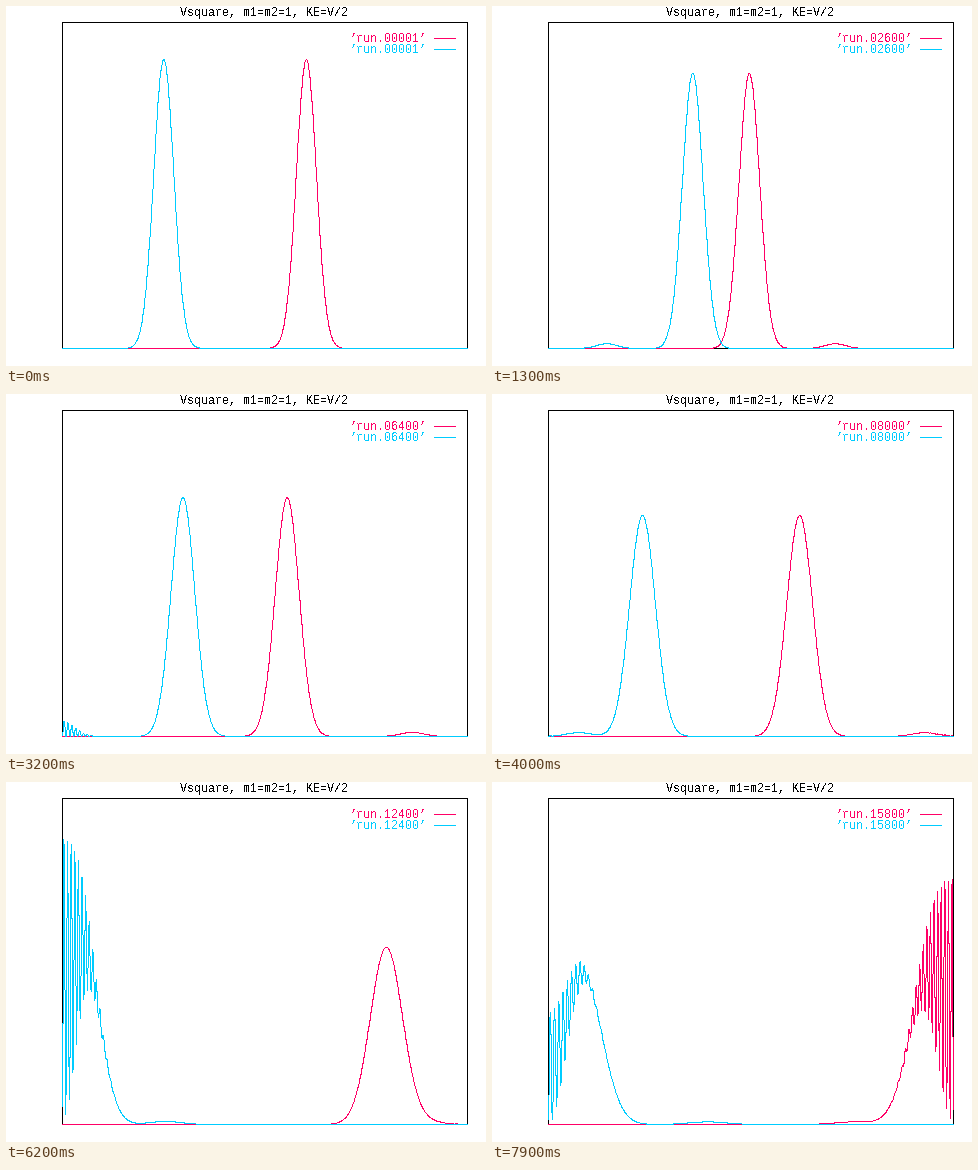
Write a matplotlib script that moves like this. It is 480 px wide and 360 px high and loops after 8 s.

```python
import math

import numpy as np
import matplotlib.pyplot as plt
from matplotlib.animation import FuncAnimation
from matplotlib.collections import LineCollection
from matplotlib.patches import Rectangle

W, H, DPI = 480, 360, 100
FRAMES, INTERVAL = 80, 100
LEFT, RIGHT, TOP, BASE = 56, 461, 16, 342
PINK, CYAN = "#ff0066", "#00ccff"
PX = 72 / DPI

# Packet physics, in pixels and frames
PEAK = 289.0            # height of the marginal density at the start
STRAY = 0.017           # share of probability sent off the wrong way
SIGMA, TAU = 10.0, 49.5  # starting width and spreading time
SPEED = 3.305
K = SPEED * TAU / (2 * SIGMA**2)
START, T_HIT = 157.3, 18.9
TURN = START + SPEED * T_HIT
MIRROR = 457.2          # sum of the two particles' positions

# Simulation grid; the hard walls sit one step outside it
x, STEP = np.linspace(LEFT, RIGHT, 1401, retstep=True)
WALL_L, WALL_R = LEFT - STEP, RIGHT + STEP
erf = np.vectorize(math.erf)


def packet(x, center, t):
    """Spreading Gaussian wave packet moving left."""
    z = 1 + 1j * t / TAU
    d = x - center
    return np.exp(-d**2 / (4 * SIGMA**2 * z) - 1j * K * d) / np.sqrt(z)


def against_wall(x, center, wall, t):
    """Density of a packet and its image behind a hard wall."""
    return np.abs(packet(x, center, t) - packet(2 * wall - x, center, t))**2


def collision(u, t):
    """Marginal density while the pair bounces off its barrier."""
    s = SIGMA * math.hypot(1, t / TAU)
    c = SPEED * (t - T_HIT)

    def half(c):
        cdf = 0.5 * (1 + erf((u + c) / (s * math.sqrt(2))))
        return np.exp(-(u - c)**2 / (2 * s * s)) * cdf

    return SIGMA / s * (half(c) + half(-c))


def density(x, wall, t):
    """Density of the left particle; its outer wall is on the left."""
    if t < 40:
        main = collision(TURN - x, t)
    else:
        main = against_wall(x, TURN - SPEED * (t - T_HIT), wall, t)
    stray = against_wall(x, START - SPEED * t, wall, t)
    return PEAK * ((1 - STRAY) * main + STRAY * stray)


cols = np.round(x).astype(int) - LEFT
touched = np.concatenate([cols, cols[:-1], cols[1:]])
centers = np.arange(LEFT, RIGHT + 1) + 0.5


def spans(p):
    """Vertical pixel runs of a one-pixel polyline, one per column."""
    y = np.round(BASE - p)
    half = np.trunc(np.diff(y) / 2)
    rows = np.concatenate([y, y[:-1] + half, y[1:] - half])
    lo = np.full(len(centers), np.inf)
    hi = -lo
    np.minimum.at(lo, touched, rows)
    np.maximum.at(hi, touched, rows)
    return np.stack([np.column_stack([centers, lo]),
                     np.column_stack([centers, hi + 1])], axis=1)


fig = plt.figure(figsize=(W / DPI, H / DPI), dpi=DPI, facecolor="white")
ax = fig.add_axes([0, 0, 1, 1])
ax.set(xlim=(0, W), ylim=(H, 0))
ax.axis("off")

crisp = dict(lw=PX, antialiased=False, snap=False)
ax.add_patch(Rectangle((LEFT + 0.5, TOP + 0.5), RIGHT - LEFT, BASE - TOP,
                       fill=False, ec="black", zorder=1, **crisp))
clip = Rectangle((LEFT, TOP), RIGHT - LEFT + 1, BASE - TOP + 1, transform=ax.transData)


def label(px, py, text, color, ha):
    return ax.text(px, py, text, color=color, ha=ha, va="baseline", antialiased=False,
                   family="Liberation Mono", size=11.667 * PX, zorder=4)


def series(color, key_y, zorder):
    ax.plot([428, 450], [key_y + 0.5] * 2, color=color, solid_capstyle="butt", **crisp)
    curve = LineCollection([], colors=color, zorder=zorder, **crisp)
    ax.add_collection(curve, autolim=False)
    curve.set_clip_path(clip)
    return curve, label(421, key_y + 4, "", color, "right")


label(258, 10, "Vsquare, m1=m2=1, KE=V/2", "black", "center")
pink, pink_key = series(PINK, 32, 2)
cyan, cyan_key = series(CYAN, 43, 3)


def update(i):
    t = float(i)
    cyan.set_segments(spans(density(x, WALL_L, t)))
    pink.set_segments(spans(density(MIRROR - x, MIRROR - WALL_R, t)))
    name = f"\u2019run.{max(1, 200 * i):05d}\u2019"
    pink_key.set_text(name)
    cyan_key.set_text(name)
    return pink, cyan, pink_key, cyan_key


anim = FuncAnimation(fig, update, frames=FRAMES, interval=INTERVAL, repeat=True,
                     repeat_delay=0, blit=False)
plt.show()
```
